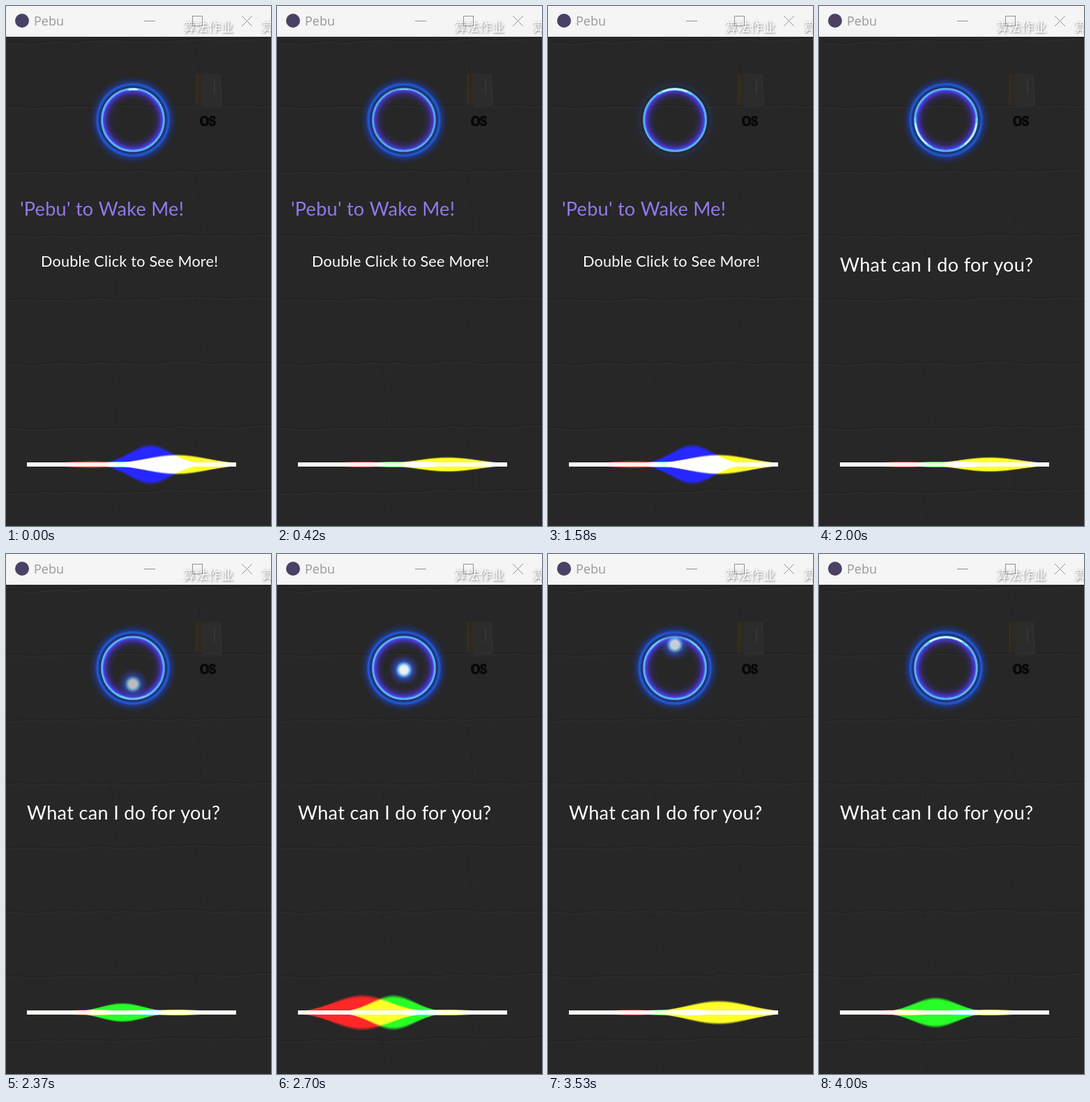
Animation, 380 px wide and 744 px high, one loop 4050 ms. Source, as an HTML page with a canvas:

```html
<!DOCTYPE html>
<html lang="en">
<head>
<meta charset="utf-8">
<title>Pebu</title>
<style>
html, body { margin: 0; width: 100%; height: 100%; overflow: hidden; background: #272727; }
canvas { display: block; }
</style>
</head>
<body>
<canvas id="stage" width="380" height="744"></canvas>
<script>
const ctx = document.getElementById('stage').getContext('2d');
const LOOP = 4050, WAVE_LOOP = 1580, WAKE = 1860;
const TAU = Math.PI * 2, TOP = -Math.PI / 2;
const ORB = { x: 182, y: 163, r: 44.5 };
const CJK = '"Noto Sans CJK SC", "Noto Sans CJK", sans-serif';
const SERIF = '"Noto Serif", serif';

// Every colour swells once per wave loop, at its own peak time
const waves = [
  { color: '#f00', x: 122, width: 40, peak: 1250 },
  { color: '#0f0', x: 167, width: 31, peak: 990 },
  { color: '#00f', x: 207, width: 30, peak: 1470 },
  { color: '#ff0', x: 245, width: 44, peak: 1775 }
];

const bump = (v, center, width) => Math.exp(-(((v - center) / width) ** 2) / 2);
const ramp = (t, from, to) => Math.min(1, Math.max(0, (t - from) / (to - from)));

function random(seed) {
  return () => (seed = (seed * 16807) % 2147483647) / 2147483647;
}

function line(points, color, width = 1) {
  ctx.beginPath();
  points.forEach(([x, y]) => ctx.lineTo(x, y));
  ctx.strokeStyle = color;
  ctx.lineWidth = width;
  ctx.stroke();
}

function crack(x, y, dx, dy, rnd) {
  const points = [];
  for (let i = 0; i <= 20; i++) {
    points.push([x + dx * i / 20 + rnd() * 4, y + dy * i / 20 + rnd() * 4]);
  }
  line(points, 'rgba(0,0,0,.1)', 2);
  line(points.map(([a, b]) => [a + 1, b + 2]), 'rgba(255,255,255,.02)', 2);
}

function text(str, x, y, size, color, family = 'Lato, sans-serif', spacing = 0) {
  ctx.font = `${size}px ${family}`;
  ctx.letterSpacing = spacing + 'px';
  ctx.fillStyle = color;
  ctx.fillText(str, x, y);
}

function wall() {
  ctx.fillStyle = '#272727';
  ctx.fillRect(0, 0, 380, 744);
  const rnd = random(42);
  for (let y = 50, row = 0; y < 744; y += 92, row++) {
    crack(-5, y, 390, -6 + rnd() * 8, rnd);
    crack(row % 2 ? 150 : 272, y, 8, 85, rnd);
  }
}

function folder() {
  ctx.fillStyle = '#30291f';
  ctx.fillRect(272, 97, 18, 45);
  ctx.fillStyle = '#2c2c2c';
  ctx.beginPath();
  [[281, 97], [307, 97], [309, 142], [281, 144]].forEach(p => ctx.lineTo(...p));
  ctx.fill();
  line([[307, 98], [309, 142], [284, 144]], '#383634');
  line([[274, 98], [273, 140]], '#40351f');
  line([[299, 105], [299, 126]], '#404040');
  text('OS', 278, 171, 18, '#3a3a3a', SERIF);
  ctx.strokeStyle = '#080808';
  ctx.lineWidth = 2;
  ctx.strokeText('OS', 278, 171);
}

function titleBar() {
  ctx.fillStyle = '#f5f5f5';
  ctx.fillRect(0, 0, 380, 44);
  ctx.fillStyle = '#4b4164';
  ctx.beginPath();
  ctx.arc(23, 21, 10, 0, TAU);
  ctx.fill();
  text('Pebu', 40, 28, 18, '#999', '"Open Sans", sans-serif');

  ctx.save();
  ctx.shadowColor = '#777';
  ctx.shadowBlur = 3;
  ctx.shadowOffsetX = ctx.shadowOffsetY = 1;
  text('算法作业', 254, 37, 18, '#fff', CJK);
  text('算', 366, 37, 18, '#fff', CJK);
  ctx.restore();

  const gray = '#929292';
  line([[198, 21.5], [214, 21.5]], gray);
  ctx.strokeRect(267.5, 14.5, 14, 14);
  line([[338, 14], [353, 29]], gray);
  line([[353, 14], [338, 29]], gray);
}

function radial(x, y, r0, r1, stops) {
  const g = ctx.createRadialGradient(x, y, r0, x, y, r1);
  stops.forEach(([p, c]) => g.addColorStop(p, c));
  ctx.fillStyle = g;
  ctx.beginPath();
  ctx.arc(x, y, r1, 0, TAU);
  ctx.fill();
}

function arc(mid, half, width, color, r = ORB.r) {
  ctx.beginPath();
  ctx.arc(ORB.x, ORB.y, r, mid - half, mid + half);
  ctx.strokeStyle = color;
  ctx.lineWidth = width;
  ctx.stroke();
}

// A light splits at the top of the ring and runs down both sides
function flares(t) {
  const turn = Math.PI * (ramp(t, WAVE_LOOP, 2215) - ramp(t, 3000, 3600));
  ctx.lineCap = 'round';
  for (const [time, half] of [[0, .16], [1850, .55], [4000, .75]]) {
    const strength = bump(t, time, 260);
    for (const mid of new Set([TOP - turn, TOP + turn])) {
      ctx.globalAlpha = strength * .6;
      arc(mid, half, 3.5, '#70e8ff', ORB.r - .5);
      ctx.globalAlpha = strength * .85;
      arc(mid, half * .7, 2.5, '#e8ffff', ORB.r - .5);
    }
  }
}

// The lights meet at the bottom and rise as one dot
function dot(t) {
  const u = ramp(t, 2215, 3750);
  ctx.globalAlpha = Math.sin(Math.PI * u) ** .3;
  radial(ORB.x, 205 - 83 * u ** .65, 0, 24, [
    [0, '#fff'], [.24, '#f0fbff'], [.36, '#70bcff'],
    [.52, 'rgba(48,85,215,.7)'], [1, 'rgba(50,40,130,0)']
  ]);
}

function orb(t) {
  const { x, y, r } = ORB;
  ctx.save();

  ctx.globalAlpha = .95 - .82 * bump(t, 1560, 170);
  radial(x, y, r, 64, [
    [0, 'rgba(24,50,150,0)'], [.02, 'rgba(24,50,150,.4)'], [.18, 'rgba(26,66,190,.6)'],
    [.33, 'rgba(34,100,250,.95)'], [.5, 'rgba(26,68,190,.5)'], [1, 'rgba(20,40,120,0)']
  ]);

  ctx.globalAlpha = 1 - .94 * bump(t, 880, 240);
  radial(x, y, 27, r, [
    [0, 'rgba(50,34,110,0)'], [.45, 'rgba(60,42,150,.4)'],
    [.82, 'rgba(76,60,235,.9)'], [1, '#4a80ff']
  ]);
  arc(0, Math.PI, 2.6, '#50c8ff');

  ctx.globalAlpha = .7;
  arc(0, Math.PI, 1, '#7a78ff');

  flares(t);
  dot(t);
  ctx.restore();
}

function hump(wave, height) {
  ctx.beginPath();
  for (const side of [-1, 1]) {
    for (let i = 0; i <= 300; i += 2) {
      const x = side < 0 ? 30 + i : 330 - i;
      ctx.lineTo(x, 656 + side * height * bump(x, wave.x, wave.width));
    }
  }
  ctx.fill();
}

function voice(t) {
  ctx.save();
  ctx.globalCompositeOperation = 'lighter';
  ctx.globalAlpha = 1 / 6;
  for (const wave of waves) {
    const fromPeak = (t - wave.peak + WAVE_LOOP * 2.5) % WAVE_LOOP - WAVE_LOOP / 2;
    const height = 4 + 36 * bump(fromPeak, 0, 120);
    ctx.fillStyle = wave.color;
    // Stacked layers give the soft edge
    for (let i = 0; i < 6; i++) hump(wave, height * (.84 + i * .045));
  }
  ctx.restore();
  ctx.fillStyle = '#fffffa';
  ctx.fillRect(30, 653, 300, 6);
}

function draw(now) {
  const t = now % LOOP;
  wall();
  folder();
  titleBar();
  orb(t);
  if (t < WAKE) {
    text("'Pebu' to Wake Me!", 20, 300, 27, '#9478f0', undefined, .3);
    text('Double Click to See More!', 50, 373, 21.6, '#fff', undefined, .24);
  } else {
    text('What can I do for you?', 30, 380, 27, '#fff', undefined, .35);
  }
  voice(t);
}

const start = performance.now();
function tick() {
  draw(performance.now() - start);
  requestAnimationFrame(tick);
}
tick();
</script>
</body>
</html>
```
